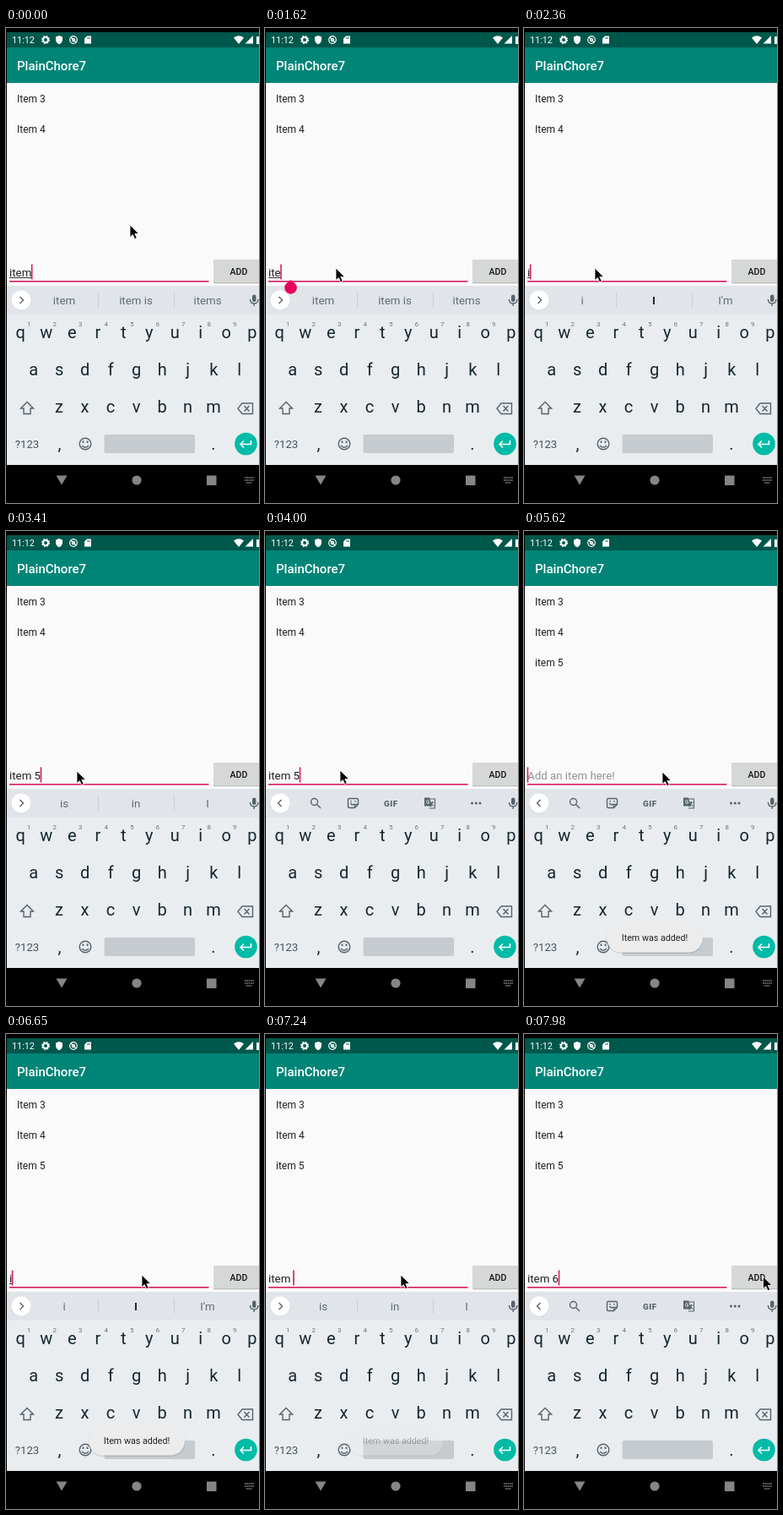
Recreate the animation shown at these times as an HTML page. Size 300 px wide and 562 px high, loop 8000 ms.

```html
<!DOCTYPE html>
<html lang="en">
<head>
<meta charset="utf-8">
<title>Todo list</title>
<style>
html, body { margin: 0; width: 100%; height: 100%; overflow: hidden; background: #000; }
svg { display: block; width: 300px; height: 562px; font-family: Roboto, sans-serif; }
text { white-space: pre; }
.mid { text-anchor: middle; }
.icon { fill: none; stroke: #57636b; stroke-width: 1.4; }
#keys { fill: #17262f; font-size: 20px; text-anchor: middle; }
#keys .digit { fill: #68747c; font-size: 8px; }
#suggestions { font-size: 13.3px; fill: #5f6b73; text-anchor: middle; }
#field, #hint { font-size: 13.3px; }
</style>
</head>
<body>
<svg viewBox="0 0 300 562">
  <rect width="300" height="562"/>
  <rect x="1" y="5" width="299" height="18" fill="#00574b"/>
  <rect x="1" y="23" width="299" height="42" fill="#008577"/>
  <rect x="1" y="65" width="299" height="240" fill="#fafafa"/>
  <rect x="1" y="305" width="299" height="34" fill="#e1e5e9"/>
  <rect x="1" y="339" width="299" height="178" fill="#e9edf0"/>

  <g id="status" fill="#fff">
    <text x="7" y="18" font-size="10.8">11:12</text>
    <circle cx="47" cy="14" r="3" fill="none" stroke="#fff" stroke-width="2"/>
    <circle cx="47" cy="14" r="4.3" fill="none" stroke="#fff" stroke-width="1.4" stroke-dasharray="1.9 1.48"/>
    <path d="M63 9l4 1.6v3q0 4-4 5.6q-4-1.6-4-5.6v-3z"/>
    <g fill="none" stroke="#fff" stroke-width="1.2">
      <circle cx="80" cy="14" r="4.3"/><circle cx="80" cy="14" r="1.6"/><path d="M77 11l6 6"/>
    </g>
    <path d="M96 9.5h5v9h-8v-6z"/>
    <path d="M97 11v2M99 11v2" stroke="#00574b"/>
    <path d="M270 11.5q6-4.5 12 0l-6 7.5zM293 9v9.5h-9.5zM297 10h3v9h-3z"/>
  </g>
  <text x="13" y="50" font-size="15" font-weight="500" fill="#fff">PlainChore7</text>

  <g font-size="12" fill="#212121">
    <text x="13" y="87.5">Item 3</text>
    <text x="13" y="123.5">Item 4</text>
    <text x="13" y="159.5" id="added">item 5</text>
  </g>

  <text id="hint" x="4" y="293.5" fill="#929292">Add an item here!</text>
  <text id="field" x="4" y="293.5" fill="#212121"></text>
  <rect id="composing" x="4" y="295" height="1" fill="#333"/>
  <rect x="4" y="299" width="236.5" height="1.6" fill="#d81b60"/>
  <rect id="caret" y="279.5" width="1.6" height="18" fill="#d81b60"/>

  <rect x="246" y="275" width="60" height="27.3" rx="1.5" fill="#bbb"/>
  <rect id="button" x="246" y="274" width="60" height="27" rx="1.5"/>
  <text class="mid" x="276" y="291.6" font-size="10.6" font-weight="500" fill="#151515">ADD</text>

  <circle cx="18" cy="322.6" r="11.8" fill="#cfd4d8"/>
  <circle cx="18" cy="322" r="11.5" fill="#fff"/>
  <path id="chevron" class="icon"/>
  <g id="suggestions">
    <path d="M109.5 313v18M199.5 313v18" stroke="#cbd0d4"/>
    <text x="69" y="327"></text><text x="154" y="327"></text><text x="239" y="327"></text>
  </g>
  <g id="tools" class="icon">
    <circle cx="58.5" cy="320.5" r="4"/><path d="M61.5 323.5l4.5 4.5"/>
    <path d="M100 316.5h9q1.5 0 1.5 1.5v5.5l-4 4h-6.5q-1.5 0-1.5-1.5v-8q0-1.5 1.5-1.5zM110 323.5h-3.500v4M101.500 322q2 3 4.500 1M102 319v1.500M107 319v1.500"/>
    <path d="M195 317h6.500v11h-6.500M196.500 321h4M198.500 320q0 4-3 6M197 322l3.500 4" stroke-width="1.1"/>
    <path d="M189 315.500h6l3 10h-9z" fill="#57636b" stroke="none"/>
    <path d="M194.500 319q-3-1.500-3 1.500t3 1.500v-1.500h-1.500" stroke="#e1e5e9" stroke-width="1"/>
    <g fill="#57636b" stroke="none">
      <text class="mid" x="149.300" y="325.500" font-size="9.800" font-weight="900" letter-spacing=".6">GIF</text>
      <circle cx="245.500" cy="322" r="1.500"/><circle cx="250.300" cy="322" r="1.500"/><circle cx="255" cy="322" r="1.500"/>
    </g>
  </g>
  <rect x="292" y="315.500" width="4.500" height="8.500" rx="2.200" fill="#57636b"/>
  <path class="icon" d="M289.500 321q0 5 4.700 5t4.700-5M294.200 326v3"/>

  <g id="keys"></g>
  <g class="icon">
    <path d="M25 442.500l7.500 7.500h-3.500v6.500h-8v-6.500h-3.500z"/>
    <path d="M280 444h12.500v12.500h-12.500l-5-6.200zM282.500 447l6 6.500M288.500 447l-6 6.500"/>
    <circle cx="94" cy="492" r="6.800"/><path d="M90 494q4 4.500 8 0"/>
    <path d="M91.500 488.500v2.500M96.500 488.500v2.500" stroke-width="1.800"/>
  </g>
  <text class="mid" x="25" y="497" font-size="13.200" fill="#46535b">?123</text>
  <rect x="116.500" y="481" width="107.500" height="22" rx="2" fill="#c6cbcf"/>
  <circle cx="284.500" cy="492" r="13.300" fill="#00bba6"/>
  <path d="M290.500 488v4.500h-12M282 488.500l-4 4l4 4" fill="none" stroke="#fff" stroke-width="1.600"/>

  <g fill="#858585">
    <path d="M59.500 529.500h13l-6.500 11z"/><circle cx="155" cy="535" r="5.600"/><rect x="238" y="529.500" width="11.500" height="11.500"/>
    <path d="M283 532h11M283 535h11M285 538h7" stroke="#858585" stroke-width="1.700" stroke-dasharray="1.600 .7"/>
  </g>

  <g id="toast">
    <rect x="97.500" y="465" width="115" height="35" rx="17" fill="#000" opacity=".1"/>
    <rect x="98" y="464" width="114" height="34.500" rx="17" fill="#ececec"/>
    <text class="mid" x="155" y="485" font-size="10.700" fill="#222">Item was added!</text>
  </g>
  <path id="handle" d="M30.500 298l5.200 4.300a7.300 7.300 0 1 1-10.400 0z" fill="#e8005f"/>
  <path id="mouse" d="M0 0V14.500L3.300 11.500L5.700 16.600L8.200 15.500L5.800 10.500H10.500Z" stroke="#fff" stroke-width=".8"/>
</svg>
<script>
const LOOP = 8000;
const $ = id => document.getElementById(id);

const KEY_PITCH = 30.5;
const keyRow = (letters, x, y) => [...letters].map((c, i) =>
  `<text x="${x + i * KEY_PITCH}" y="${y}">${c}</text>`).join('');
const digits = [...'1234567890'].map((d, i) =>
  `<text class="digit" x="${27.3 + i * KEY_PITCH}" y="352.5">${d}</text>`).join('');
$('keys').innerHTML = keyRow('qwertyuiop', 17.3, 366.5) + digits + keyRow('asdfghjkl', 32.7, 411)
  + keyRow('zxcvbnm', 63, 455) + keyRow(',', 63.5, 499) + keyRow('.', 246, 499);

const TOOLS = null;
const I = ['i', 'I', "I'm"];
const IT = ['it', 'it is', "it's"];
const ITEM = ['item', 'item is', 'items'];
const NEXT = ['is', 'in', 'I'];

// Each step overrides part of the state from its time on.
const steps = [
  [0, { text: 'item', caret: true, words: ITEM, mouse: [147, 233], handle: false, pressed: false, added: false, toast: 0 }],
  [140, { caret: false }],
  [440, { mouse: [142, 238] }],
  [590, { mouse: [122, 256], caret: true }],
  [730, { mouse: [98, 277] }],
  [880, { mouse: [86, 284] }],
  [1020, { mouse: [84, 284] }],
  [1320, { handle: true }],
  [1620, { text: 'ite' }],
  [1770, { text: 'it', handle: false }],
  [1920, { text: 'i', words: IT }],
  [2060, { text: '', words: TOOLS }],
  [2210, { text: 'i' }],
  [2360, { words: I }],
  [2510, { text: 'item', words: ITEM }],
  [2810, { text: 'item ', words: NEXT }],
  [3410, { text: 'item 5' }],
  [3560, { words: TOOLS }],
  [3700, { mouse: [85, 284] }],
  [3850, { mouse: [87, 283] }],
  [4000, { mouse: [89, 283] }],
  [4140, { mouse: [120, 284] }],
  [4290, { mouse: [190, 286] }],
  [4430, { mouse: [253, 287] }],
  [4580, { mouse: [276, 286] }],
  [4730, { mouse: [281.5, 285] }],
  [4880, { text: '', pressed: true }],
  [5170, { pressed: false, added: true, toast: .3 }],
  [5320, { mouse: [262, 286], toast: .7 }],
  [5470, { mouse: [212, 286], toast: 1 }],
  [5620, { mouse: [164, 285] }],
  [5770, { mouse: [161, 285] }],
  [5920, { caret: false }],
  [6200, { caret: true }],
  [6500, { text: 'i' }],
  [6650, { words: I }],
  [6800, { text: 'it', words: IT }],
  [6940, { text: 'ite', words: ITEM }],
  [7090, { text: 'item', toast: .7 }],
  [7240, { text: 'item ', words: NEXT, toast: .3 }],
  [7390, { text: 'item 6', toast: 0 }],
  [7540, { mouse: [246, 288] }],
  [7690, { mouse: [268, 288], words: TOOLS }],
  [7830, { mouse: [280, 287] }],
  [7980, { mouse: [283.5, 287] }]
];

const show = (id, on) => $(id).style.display = on ? '' : 'none';
const wordSlots = document.querySelectorAll('#suggestions text');

function draw(state) {
  $('field').textContent = state.text;
  const width = state.text ? $('field').getComputedTextLength() : 0;
  $('caret').setAttribute('x', 4 + width - .4);
  $('composing').setAttribute('width', state.text.includes(' ') ? 0 : width);
  show('caret', state.caret);
  show('hint', !state.text);
  show('handle', state.handle);
  show('added', state.added);
  show('tools', !state.words);
  show('suggestions', state.words);
  wordSlots.forEach((slot, i) => {
    const bold = state.words === I && i === 1;
    slot.textContent = state.words ? state.words[i] : '';
    slot.setAttribute('font-weight', bold ? 700 : 400);
    slot.setAttribute('fill', bold ? '#17262f' : '#5f6b73');
  });
  $('chevron').setAttribute('d', state.words ? 'M16.500 318l4 4l-4 4' : 'M19.500 318l-4 4l4 4');
  $('button').setAttribute('fill', state.pressed ? '#adadad' : '#d6d7d7');
  $('toast').setAttribute('opacity', state.toast);
  $('mouse').setAttribute('transform', `translate(${state.mouse})`);
}

function frame() {
  const time = performance.now() % LOOP;
  draw(Object.assign({}, ...steps.filter(([start]) => start <= time).map(([, change]) => change)));
  requestAnimationFrame(frame);
}
frame();
</script>
</body>
</html>
```
